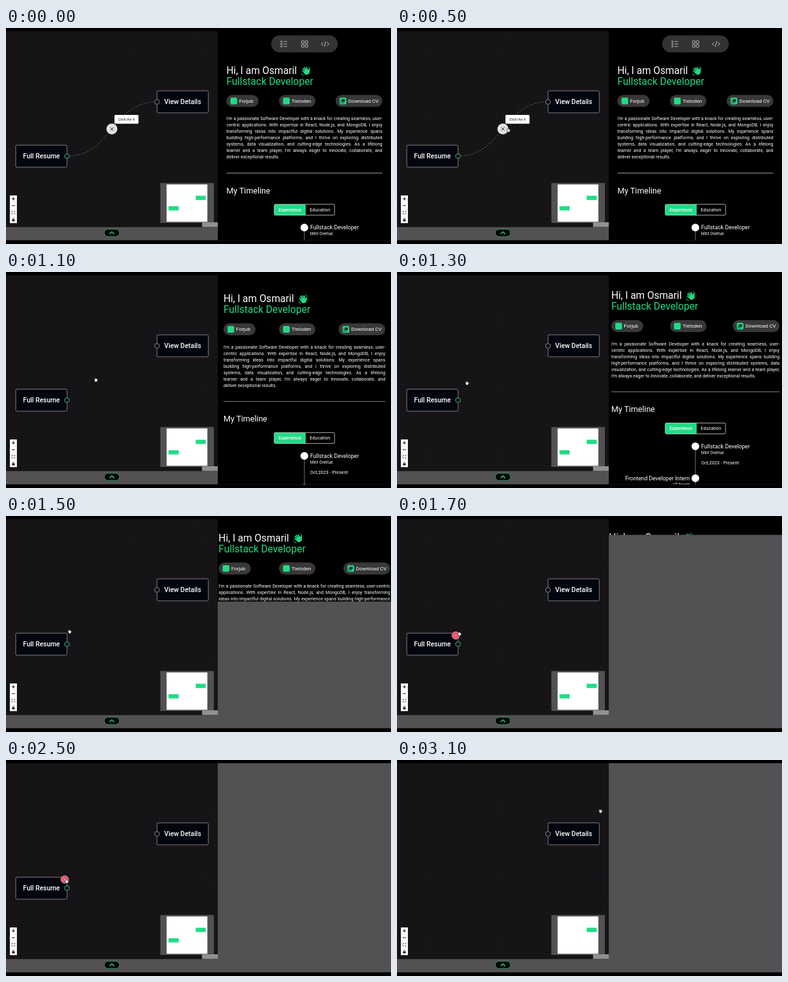
An HTML page with a canvas that plays this animation: 600 px wide and 338 px high, repeating every 3200 ms.

```html
<!DOCTYPE html>
<html lang="en">
<head>
<meta charset="utf-8">
<title>Resume flow</title>
<style>
  html, body { margin: 0; width: 100%; height: 100%; overflow: hidden; background: #000; }
  canvas { display: block; width: 600px; height: 338px; }
</style>
</head>
<body>
<canvas id="stage"></canvas>
<script>
const LOOP = 3200, STEP = 100;
const EDGE_REMOVED = 850, COLLAPSE_START = 880, COLLAPSE_TIME = 1000;
const DELETE_SHOWN = 1600, NODE_DELETED = 2700;
const GREEN = '#20dc86', GRAY = '#535153', PILL = '#393839', NODE = '#03050f';
const PAD = 13.5, CONTENT_HEIGHT = 1265;

const canvas = document.getElementById('stage');
const ctx = canvas.getContext('2d');
const ratio = window.devicePixelRatio || 1;
canvas.width = 600 * ratio;
canvas.height = 338 * ratio;

const words = ("I'm a passionate Software Developer with a knack for creating seamless, user- centric " +
  'applications. With expertise in React, Node.js, and MongoDB, I enjoy transforming ideas into ' +
  'impactful digital solutions. My experience spans building high-performance platforms, and I ' +
  'thrive on exploring distributed systems, data visualization, and cutting-edge technologies. As a ' +
  "lifelong learner and a team player, I'm always eager to innovate, collaborate, and deliver " +
  'exceptional results.').split(' ');

// Words per line for the narrow, medium and full panel width.
const wraps = {
  narrow: [12, 11, 9, 9, 9, 12, 3],
  medium: [12, 11, 10, 10, 12, 10],
  full: [13, 11, 10, 11, 12, 8]
};

const cursorPath = [
  [250, 179, 168], [500, 173.5, 160], [900, 171, 164], [1300, 109, 174], [1500, 99, 181],
  [2000, 94.5, 190], [2700, 94.5, 190], [3000, 116, 172], [3100, 317, 80]
];

const dots = new Path2D();
for (let y = 7; y < 311; y += 4)
  for (let x = 2; x < 330; x += 4) dots.rect(x, y, 1, 1);

function rect(x, y, w, h, fill, radius = 0, stroke, lineWidth = 0.7) {
  ctx.beginPath();
  ctx.roundRect(x, y, w, h, radius);
  if (fill) { ctx.fillStyle = fill; ctx.fill(); }
  if (stroke) { ctx.strokeStyle = stroke; ctx.lineWidth = lineWidth; ctx.stroke(); }
}

function circle(x, y, r, fill, stroke, lineWidth = 1) {
  rect(x - r, y - r, 2 * r, 2 * r, fill, r, stroke, lineWidth);
}

function path(d, color, width, x = 0, y = 0) {
  ctx.save();
  ctx.translate(x, y);
  ctx.strokeStyle = color;
  ctx.lineWidth = width;
  ctx.stroke(new Path2D(d));
  ctx.restore();
}

function text(str, x, y, size, { color = '#fff', weight = 400, align = 'left' } = {}) {
  ctx.font = `${weight} ${size}px Roboto, sans-serif`;
  ctx.fillStyle = color;
  ctx.textAlign = align;
  ctx.textBaseline = 'alphabetic';
  ctx.fillText(str, x, y + size * 0.355);
}

// CSS "ease": cubic-bezier(.25, .1, .25, 1), solved by bisection.
function ease(p) {
  if (p <= 0) return 0;
  if (p >= 1) return 1;
  const curve = (s, a, b) => 3 * (1 - s) ** 2 * s * a + 3 * (1 - s) * s * s * b + s ** 3;
  let low = 0, high = 1;
  for (let i = 0; i < 20; i++) {
    const mid = (low + high) / 2;
    if (curve(mid, 0.25, 0.25) < p) low = mid; else high = mid;
  }
  return curve(low, 0.1, 1);
}

function hand(x, y, scale, angle, color) {
  ctx.save();
  ctx.translate(x, y);
  ctx.rotate(angle);
  ctx.scale(scale, scale);
  ctx.lineCap = 'round';
  ctx.beginPath();
  ctx.ellipse(0, 2.6, 4.4, 4.2, 0, 0, 7);
  ctx.fillStyle = color;
  ctx.fill();
  path('M-3.3 2L-4.2 -3.4M-1.1 1L-1.4 -5.6M1.2 1L1.3 -5.4M3.3 2L3.9 -3.6M3.2 4.5L6.4 0.8', color, 1.9);
  ctx.restore();
}

function wavingHand(x, y, t) {
  hand(x, y, 0.95, -0.6 + 0.18 * Math.sin(t / 800 * Math.PI * 2), GREEN);
  path('M-6.8 3.5Q-6 6.5 -3 7.6M3.2 -7Q5.8 -6 6.6 -3.4', GREEN, 0.9, x, y);
}

function node(label, x, y) {
  rect(x, y, 80, 34.5, NODE, 2, '#9b9b9d', 0.8);
  text(label, x + 40, y + 17.3, 10.45, { weight: 500, align: 'center' });
}

function edge(t) {
  ctx.setLineDash([2.2, 2.2]);
  ctx.lineDashOffset = -t / 500 * 4.4;
  path('M95 200.5C165 200.5 165 115.5 235.5 115.5', '#858587', 0.7);
  ctx.setLineDash([]);
  circle(165, 158, 8.5, '#e2e1e4');
  path('M-2.7 -2.7L2.7 2.7M2.7 -2.7L-2.7 2.7', '#222', 0.9, 165, 158);
  rect(169, 136, 37.5, 13.8, '#fff', 1.5);
  text('Click the X', 187.7, 143, 5.5, { color: '#222', align: 'center' });
}

function controls() {
  rect(6, 262, 11, 43.3, '#fefefe');
  for (let i = 1; i < 4; i++) rect(6, 262 + i * 10.8, 11, 0.4, '#ddd');
  path('M-2.4 0H2.4M0 -2.4V2.4', '#111', 1, 11.5, 267.3);
  path('M-2.4 0H2.4', '#111', 1, 11.5, 278);
  path('M-2.3 -0.8V-2.1H-1M1 -2.1H2.3V-0.8M2.3 0.8V2.1H1M-1 2.1H-2.3V0.8', '#111', 0.8, 11.5, 289);
  rect(9.5, 299.5, 4, 3, '#111');
  path('M-1.2 0V-1A1.2 1.2 0 0 1 1.2 -1V0', '#111', 0.7, 11.5, 299.6);
}

function flow(t) {
  const hasResume = t < NODE_DELETED;
  rect(0, 5, 330, 307, '#151316');
  ctx.fillStyle = '#222023';
  ctx.fill(dots);

  if (t < EDGE_REMOVED) edge(t);
  node('View Details', 235.3, 98.3);
  circle(235.4, 115.6, 3.8, '#0d0e13', '#88888b');
  if (hasResume) {
    node('Full Resume', 15.2, 183.3);
    circle(95, 200.6, 3.8, '#071512', '#3fae88');
    if (t >= DELETE_SHOWN) {
      circle(91.5, 187, 5.8, '#ee4a63', '#e9c5cb', 0.9);
      path('M-2 -2L2 2M2 -2L-2 2', '#fbd9dd', 0.8, 91.5, 187);
    }
  }

  rect(240.5, 242.5, 83.5, 62.5, GRAY);
  rect(250.3, 244.8, 63.5, 58.5, '#fff');
  rect(295.7, 262.5, 15.5, 6.7, GREEN);
  if (hasResume) rect(253.3, 278.8, 15.7, 6.7, GREEN);
  rect(305.5, 304, 24.5, 7.5, '#929093');
  controls();

  rect(0, 311.5, 330, 20.8, GRAY);
  rect(153.2, 315, 23.6, 11.2, '#000', 5.6, '#2a9d6b', 0.9);
  path('M-3.7 1.8L0 -1.7L3.7 1.8', GREEN, 1.4, 165, 320.6);
}

function navigation() {
  const color = '#c4c2c4';
  rect(413.3, 11.5, 103.7, 26.7, '#343334', 13.3);
  for (const y of [-3.8, 0, 3.8]) {
    rect(428.2, 24 + y, 2, 2, null, 0, color, 0.7);
    path('M0 0H5.6', color, 0.9, 432.5, 25 + y);
  }
  for (const x of [460.5, 466.3])
    for (const y of [20.2, 26]) rect(x, y, 4, 4, null, 0.4, color, 0.9);
  path('M-3 -2.8L-5.8 0L-3 2.8M3 -2.8L5.8 0L3 2.8M1.2 -4.2L-1.2 4.2', color, 1, 497.3, 25);
}

function linkPill(label, x, y, width) {
  rect(x, y - 9.4, width, 18.8, PILL, 9.4);
  rect(x + 6.3, y - 5.1, 10.4, 10.4, GREEN, 2);
  text(label, x + 19.7, y, 7.95);
}

function paragraph(lineCounts, x, y, width) {
  let next = 0;
  lineCounts.forEach((count, row) => {
    const line = words.slice(next, next += count).join(' ').replace('user- c', 'user-c');
    const parts = line.split(' ');
    ctx.font = '400 7px Roboto, sans-serif';
    const natural = parts.reduce((sum, part) => sum + ctx.measureText(part).width, 0);
    const last = row === lineCounts.length - 1;
    const gap = last ? ctx.measureText(' ').width : (width - natural) / (parts.length - 1);
    let left = x;
    for (const part of parts) {
      text(part, left, y + row * 10, 7);
      left += ctx.measureText(part).width + gap;
    }
  });
}

function timeline(y, left, right) {
  rect(left, y, right - left, 0.8, '#a5a5a5');
  text('My Timeline', left, y + 28, 12.6);

  rect(418, y + 49.3, 49, 17, GREEN, [2, 0, 0, 2]);
  rect(418, y + 49.3, 94, 17, null, 2, '#ddd', 0.8);
  text('Experience', 442.5, y + 57.7, 7.2, { align: 'center', weight: 500 });
  text('Education', 489.3, y + 57.7, 7.2, { align: 'center' });

  const dot = y + 85.7;
  rect(464.6, dot, 0.8, 300, '#8f8f8f');
  circle(465, dot, 6, '#fff');
  text('Fullstack Developer', 474, dot, 8.75);
  text('Mint Overlue', 474, dot + 9.8, 6.3);
  text('Oct,2023 - Present', 474, dot + 26, 7.2);
  circle(465, dot + 50, 6, '#fff');
  text('Frontend Developer Intern', 456, dot + 50, 8.75, { align: 'right' });
  text('VT Norell', 456, dot + 59.8, 6.3, { align: 'right' });
}

function profile(t) {
  const rest = 1 - ease((t - COLLAPSE_START) / COLLAPSE_TIME);
  const height = Math.min(327.3, CONTENT_HEIGHT * rest);
  rect(330, 5, 270, 327.3, GRAY);
  if (height <= 0) return;

  const pad = PAD * rest, left = 330 + pad, right = 600 - pad;
  const hasNav = t < EDGE_REMOVED;
  const top = pad - PAD - (hasNav ? 0 : 20);
  const lines = pad > 7 ? wraps.narrow : pad > 2 ? wraps.medium : wraps.full;

  ctx.save();
  ctx.beginPath();
  ctx.rect(330, 5, 270, height);
  ctx.clip();
  rect(330, 5, 270, 328, '#000');
  if (hasNav) navigation();
  text('Hi, I am Osmaril', left, 66.3 + top, 15.6);
  wavingHand(left + 123.8, 67 + top, t);
  text('Fullstack Developer', left, 83.5 + top, 15.6, { color: GREEN });
  linkPill('Forjub', left, 114.2 + top, 50);
  linkPill('Tieloden', 425.4, 114.2 + top, 56.8);
  linkPill('Download CV', right - 72.8, 114.2 + top, 72.8);
  const iconX = right - 61.3, iconY = 114.3 + top;
  rect(iconX - 2, iconY - 3, 5, 4.5, '#123a28', 0.5);
  path('M-3.2 -1.4V3H1.6M-0.8 -1.6H1.8M-0.8 0H1.8', '#123a28', 0.8, iconX, iconY);
  paragraph(lines, left, 142 + top, right - left);
  timeline(156.6 + top + lines.length * 10, left, right);
  ctx.restore();
}

function cursor(t) {
  const i = cursorPath.findLastIndex(([time]) => time <= t);
  if (i < 0) return;
  const [t0, x0, y0] = cursorPath[i];
  const [t1, x1, y1] = cursorPath[i + 1] || [t0 + 1, x0, y0];
  const p = (t - t0) / (t1 - t0);
  const x = x0 + (x1 - x0) * p, y = y0 + (y1 - y0) * p;
  hand(x, y, 0.52, -0.25, '#111');
  hand(x, y, 0.4, -0.25, '#fff');
}

function draw(t) {
  ctx.setTransform(ratio, 0, 0, ratio, 0, 0);
  rect(0, 0, 600, 338, '#000');
  flow(t);
  profile(t);
  cursor(t);
}

const start = performance.now();
function tick() {
  const t = (performance.now() - start) % LOOP;
  draw(Math.floor(t / STEP) * STEP);
  requestAnimationFrame(tick);
}
tick();
</script>
</body>
</html>
```
